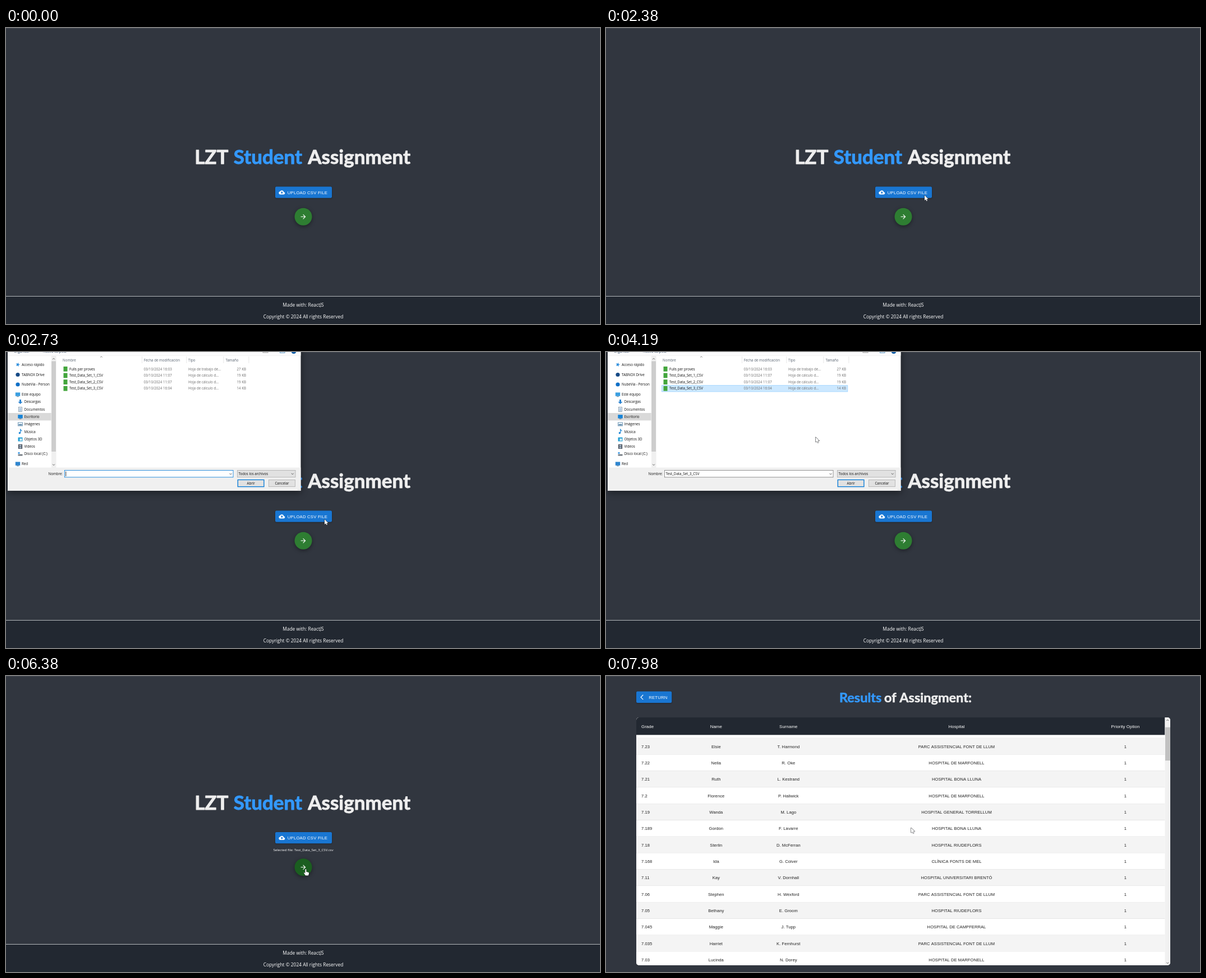
These frames come from a looping animation (1059x529 px, 8 s). An HTML page with a canvas:

```html
<!DOCTYPE html>
<html lang="en">
<head>
<meta charset="utf-8">
<title>Student Assignment</title>
<style>
html, body { margin: 0; width: 100%; height: 100%; overflow: hidden; background: #31363f; }
canvas { display: block; }
</style>
</head>
<body>
<canvas id="stage" width="1059" height="529"></canvas>
<script>
const W = 1059, H = 529, LOOP = 8000;
const stage = document.getElementById('stage').getContext('2d');
const HEAD = 'Lato, sans-serif';
const UI = '"Open Sans", "Noto Sans", sans-serif';
const ARIAL = '"Liberation Sans", Arial, sans-serif';
const BLUE = '#1976d2';

// Dialog buffer: scaled and faded as a whole
const PAD = 90;
const buffer = document.createElement('canvas');
buffer.width = 560;
buffer.height = 270 + PAD;
const dialogCtx = buffer.getContext('2d');

let g = stage;

const clamp = v => Math.max(0, Math.min(1, v));
const ramp = (t, a, b) => clamp((t - a) / (b - a));

function rect(x, y, w, h, fill) {
  g.fillStyle = fill;
  g.fillRect(x, y, w, h);
}

function round(x, y, w, h, r, fill) {
  g.beginPath();
  g.roundRect(x, y, w, h, r);
  g.fillStyle = fill;
  g.fill();
}

function disc(x, y, r, fill) {
  g.beginPath();
  g.arc(x, y, r, 0, 7);
  g.fillStyle = fill;
  g.fill();
}

function frame(x, y, w, h, fill, line, width = 0.8) {
  rect(x, y, w, h, fill);
  g.strokeStyle = line;
  g.lineWidth = width;
  g.strokeRect(x, y, w, h);
}

function poly(points, line, width) {
  g.beginPath();
  points.forEach(([x, y]) => g.lineTo(x, y));
  g.strokeStyle = line;
  g.lineWidth = width;
  g.stroke();
}

function chevron(x, y, dir, size, line) {
  poly([[x - size, y - dir * size / 2], [x, y + dir * size / 2], [x + size, y - dir * size / 2]], line, 0.9);
}

// y is the middle of the capitals
function text(str, x, y, size, fill, { font = UI, weight = 400, align = 'left', space = 0 } = {}) {
  g.font = `${weight} ${size}px ${font}`;
  g.textAlign = align;
  g.letterSpacing = space + 'px';
  g.fillStyle = fill;
  g.fillText(str, x, y + size * 0.36);
}

// Bold heading, thickened with a thin outline
function heading(str, x, y, size, fill, align = 'left') {
  text(str, x, y, size, fill, { font: HEAD, weight: 700, align });
  g.lineJoin = 'round';
  g.lineWidth = size * 0.025;
  g.strokeStyle = fill;
  g.strokeText(str, x, y + size * 0.36);
}

function icon(path, x, y, size, fill) {
  g.save();
  g.translate(x - size / 2, y - size / 2);
  g.scale(size / 24, size / 24);
  g.fillStyle = fill;
  g.fill(path);
  g.restore();
}

function shadowed(dy, blur, alpha, draw) {
  g.save();
  g.shadowColor = `rgba(0,0,0,${alpha})`;
  g.shadowOffsetY = dy;
  g.shadowBlur = blur;
  draw();
  g.restore();
}

const CLOUD = new Path2D('M19.35 10.04C18.67 6.59 15.64 4 12 4 9.11 4 6.6 5.64 5.35 8.04 2.34 8.36 0 10.91 0 14c0 3.31 2.69 6 6 6h13c2.76 0 5-2.24 5-5 0-2.64-2.05-4.78-4.65-4.96zM14 13v4h-4v-4H7l5-5 5 5h-3z');
const FORWARD = new Path2D('M12 4l-1.41 1.41L16.17 11H4v2h12.17l-5.58 5.59L12 20l8-8z');
const BACK = new Path2D('M17.77 3.77 16 2 6 12l10 10 1.77-1.77L9.54 12z');

// Pointer: [time, x, y]
const TRACK = [
  [440, 947, 521], [650, 842, 462], [860, 730, 412], [1070, 643, 374], [1210, 608, 360],
  [1420, 590, 334], [1700, 570, 302], [1840, 568, 299], [2730, 568, 299],
  [3010, 518, 246], [3280, 460, 213], [3480, 330, 120], [3700, 228, 64], [3840, 226, 63],
  [4000, 300, 108], [4130, 373, 150], [4250, 375, 154], [4600, 439, 231], [4830, 441, 233],
  [4945, 531, 238], [5015, 561, 288], [5250, 560, 318], [5560, 541, 346], [5770, 540, 347],
  [5980, 534, 345], [7240, 534, 345], [7310, 538, 315], [7400, 542, 285], [7510, 544, 271],
  [8000, 544, 271]
];

function pointerAt(t) {
  const step = 69.4;
  const q = Math.max(440, 440 + Math.floor((t - 435) / step) * step);
  const i = Math.max(1, TRACK.findIndex(k => k[0] >= q));
  const [a, b] = [TRACK[i - 1], TRACK[i]];
  const p = ramp(q, a[0], b[0]);
  return { x: a[1] + (b[1] - a[1]) * p, y: a[2] + (b[2] - a[2]) * p };
}

const ARROW = new Path2D('M0 0V9.2L2.1 7.3 3.5 10.4 5 9.8 3.6 6.7H6.5Z');
const HAND = new Path2D('M-.6 1Q.4-1 1.4 1V5L5 5.8Q6.4 6.3 6 8.5L5 11.6H0L-2.8 7.4Q-3 6-1.8 6.4L-.6 7.6Z');

function drawPointer(p, hand) {
  g.save();
  g.translate(p.x, p.y);
  g.lineJoin = 'round';
  g.lineWidth = 1;
  g.strokeStyle = '#15171b';
  g.fillStyle = '#fff';
  const shape = hand ? HAND : ARROW;
  g.stroke(shape);
  g.fill(shape);
  g.restore();
}

function backdrop() {
  rect(0, 0, W, H, '#31363f');
  rect(0, 0, W, 1, '#444951');
}

function button(x, y, w, label, textX, path, iconX) {
  shadowed(0.8, 2.5, 0.35, () => round(x, y, w, 20.3, 2.2, BLUE));
  icon(path, iconX, y + 10.3, 11, '#fff');
  text(label, textX, y + 10.3, 7.72, '#fff', { font: ARIAL, space: 0.2 });
}

function home(t, pointer) {
  backdrop();
  const chosen = t >= 5015;
  const shift = chosen ? 4.5 : 0;
  const titleY = 230.5 - shift;
  heading('LZT', 396.5, titleY, 35, '#eee', 'right');
  heading('Student', 405.8, titleY, 35, '#3399ff');
  heading('Assignment', 538.2, titleY, 35, '#eee');

  const top = 283.5 - shift;
  button(480, top, 101, 'UPLOAD CSV FILE', 501.8, CLOUD, 491.8);
  const press = ramp(t, 2110, 2380);
  if (press > 0 && press < 1) {
    g.save();
    g.beginPath();
    g.roundRect(480, top, 101, 20.3, 2.2);
    g.clip();
    disc(568, 299, 20 + 90 * press, `rgba(255,255,255,${0.2 * (1 - press)})`);
    g.restore();
  }
  const label = { align: 'center', weight: 500 };
  if (chosen) text('Selected file: Test_Data_Set_3_CSV.csv', 530, 311, 6.15, '#fff', label);

  const cy = 337.3 + shift;
  const over = chosen && Math.hypot(pointer.x - 530, pointer.y - cy) < 15.5;
  shadowed(2, 7, 0.4, () => disc(530, cy, 15.5, over ? '#1b5e20' : '#2e7d32'));
  icon(FORWARD, 530, cy, 13.2, '#fff');

  rect(0, 479, W, 50, '#222831');
  rect(0, 479, W, 1, '#b4b7bb');
  text('Made with: ReactJS', 530, 495, 8.35, '#fff', label);
  text('Copyright © 2024 All rights Reserved', 530, 515.5, 8.4, '#fff', label);
  return over;
}

const FILES = [
  ['Fulls per proves', '03/10/2024 16:03', 'Hoja de trabajo de...', '27 KB'],
  ['Test_Data_Set_1_CSV', '03/10/2024 11:07', 'Hoja de cálculo d...', '19 KB'],
  ['Test_Data_Set_2_CSV', '03/10/2024 11:07', 'Hoja de cálculo d...', '19 KB'],
  ['Test_Data_Set_3_CSV', '03/10/2024 16:04', 'Hoja de cálculo d...', '14 KB']
];

const PLACES = [
  ['Acceso rápido', 22.5, 0, 'star', '#2f8fdd'], ['TABNOX Drive', 40.5, 0, 'disc', '#164a86'],
  ['NubeVia - Person', 58, 0, 'disc', '#0f6fc6'], ['Este equipo', 76, 0, 'screen', '#3a9fe0'],
  ['Descargas', 89, 1, 'down', '#2b83d0'], ['Documentos', 102.5, 1, 'page', '#7d92a5'],
  ['Escritorio', 115.8, 1, 'screen', '#1583d8'], ['Imágenes', 129, 1, 'photo', '#5b87a8'],
  ['Música', 142.3, 1, 'note', '#1c86d6'], ['Objetos 3D', 155.6, 1, 'cube', '#26a0d4'],
  ['Vídeos', 169, 1, 'film', '#4a4f58'], ['Disco local (C:)', 182.2, 1, 'disk', '#737a82'],
  ['Red', 200, 0, 'screen', '#2f86cf']
];

function placeIcon(kind, x, y, fill) {
  if (kind === 'disc') disc(x, y, 3.6, fill);
  else if (kind === 'star' || kind === 'down') {
    g.beginPath();
    if (kind === 'star') {
      for (let i = 0; i < 10; i++) {
        const r = i % 2 ? 1.7 : 4, a = i * Math.PI / 5 - 1.3;
        g.lineTo(x + r * Math.cos(a), y + r * Math.sin(a));
      }
    } else {
      [[-1.5, -4], [1.5, -4], [1.5, 0], [4, 0], [0, 4], [-4, 0], [-1.5, 0]].forEach(p => g.lineTo(x + p[0], y + p[1]));
    }
    g.fillStyle = fill;
    g.fill();
  } else if (kind === 'note') {
    disc(x - 1.2, y + 2.5, 1.7, fill);
    poly([[x + 0.2, y + 2.5], [x + 0.2, y - 4], [x + 2.8, y - 1]], fill, 1.2);
  } else if (kind === 'page') {
    frame(x - 3, y - 4, 6, 8, '#f5f8fb', fill);
    for (let i = -2; i <= 2; i += 2) rect(x - 1.8, y + i, 3.6, 0.8, '#4d88bd');
  } else if (kind === 'photo') {
    frame(x - 4, y - 3, 8, 6, '#e8f2f9', fill);
    rect(x - 3, y, 6, 2.2, fill);
  } else if (kind === 'film') {
    rect(x - 3.6, y - 4, 7.2, 8, fill);
    rect(x - 2, y - 3, 4, 2.6, '#9fb4c7');
    rect(x - 2, y + 0.5, 4, 2.6, '#9fb4c7');
  } else if (kind === 'disk') {
    rect(x - 4, y + 0.5, 8, 2.8, fill);
    rect(x - 4, y - 3, 3, 2.6, '#2b8fe0');
  } else if (kind === 'cube') {
    rect(x - 4, y - 3, 8, 7, fill);
    rect(x - 1, y - 1, 4, 4, '#d4f0fa');
  } else {
    rect(x - 4.2, y - 3.6, 8.4, 6.4, fill);
    rect(x - 2, y + 3.3, 4, 0.9, '#5b7488');
  }
}

function dialog(t, pointer) {
  const grey = '#6d6d6d', small = 6.2;
  g.clearRect(0, 0, buffer.width, buffer.height);
  g.save();
  g.translate(0, PAD);
  shadowed(3, 12, 0.45, () => rect(3, -84, 522.5, 332, '#fff'));

  // Toolbar
  rect(3, -84, 522.5, 90, '#fbfbfc');
  text('Organizar', 14, -1.6, small, '#1e395b');
  text('Nueva carpeta', 66, -1.6, small, '#1e395b');
  chevron(55, -1, 1, 1.6, '#555');
  frame(458, -4, 9, 5, '#eee', '#8f8f8f');
  chevron(476, -1, 1, 1.6, '#555');
  frame(488.5, -4, 8.5, 5.5, '#fff', '#3d86bd');
  disc(513, -1.2, 4.4, '#1660a8');
  rect(3, 6, 522.5, 0.7, '#ececec');

  // Places
  rect(3, 109, 77.5, 13.4, '#d9d9d9');
  g.save();
  g.beginPath();
  g.rect(3, 0, 77.3, 207);
  g.clip();
  for (const [name, y, depth, kind, fill] of PLACES) {
    placeIcon(kind, 21 + depth * 4.5, y, fill);
    text(name, 28 + depth * 4.4, y, small, '#111');
  }
  g.restore();
  rect(81, 7, 8.5, 200, '#f0f0f0');
  rect(81, 16.5, 8, 161.5, '#cdcdcd');
  chevron(85, 12.3, -1, 2, '#505050');
  chevron(85, 201.5, 1, 2, '#505050');

  // File list
  [242, 321.5, 387.5, 432.5].forEach(x => rect(x, 8, 0.8, 12, '#e2e2e2'));
  chevron(170, 8.7, -1, 1.8, '#777');
  [['Nombre', 101], ['Fecha de modificación', 245.7], ['Tipo', 325], ['Tamaño', 391.5]]
    .forEach(([s, x]) => text(s, x, 14.5, small, '#55606e'));
  const picked = t >= 3770;
  FILES.forEach(([name, date, type, size], i) => {
    const y = 30.4 + i * 11.6, top = y - 5.8;
    const over = t < 4400 && pointer.x > 99 && pointer.x < 431 && pointer.y >= top && pointer.y < top + 11.6;
    if (picked && i === 3) frame(99.5, top + 0.3, 331.3, 11.2, '#cce8ff', '#99d1ff');
    else if (over) rect(99.5, top, 331.5, 11.6, '#e5f3ff');
    rect(102.5, y - 4.4, 7, 8.8, '#43a63c');
    text(name, 113, y, small, '#111');
    text(date, 245.5, y, small, grey);
    text(type, 325, y, small, grey);
    text(size, 428, y, small, grey, { align: 'right' });
  });

  // Footer
  rect(3, 206.5, 522.5, 41.5, '#f0f0f0');
  text('Nombre:', 101, 217.6, small, '#111', { align: 'right' });
  frame(104.5, 211.5, 300.5, 12.3, '#fff', picked ? '#7a7a7a' : '#0078d7');
  const marked = t >= 4760;
  if (marked) rect(106, 213.3, 61, 9, '#0078d7');
  if (picked) text(FILES[3][0], 106.5, 217.8, small, marked ? '#fff' : '#111');
  else if ((t - 2600) % 1060 < 530) rect(106.4, 213.5, 0.8, 8.5, '#000');
  chevron(400.5, 218, 1, 2, '#444');
  frame(412.5, 211.5, 103.5, 12.3, '#e1e1e1', '#adadad');
  text('Todos los archivos', 414.6, 217.6, small, '#111');
  chevron(510.8, 217.8, 1, 2, '#444');
  const overOpen = pointer.x > 413 && pointer.x < 460 && pointer.y > 228 && pointer.y < 241;
  frame(413.3, 228.4, 46.6, 12.3, overOpen ? '#e5f1fb' : '#e1e1e1', '#0078d7', 1.3);
  frame(468.5, 228.4, 47, 12.3, '#e1e1e1', '#adadad');
  text('Abrir', 436.7, 234.4, small, '#111', { align: 'center' });
  text('Cancelar', 492, 234.4, small, '#111', { align: 'center' });
  for (let i = 0; i < 3; i++) rect(523.5 - i * 1.6, 245.8, 0.8, 0.8, '#b4b4b4');
  g.restore();
}

function showDialog(t, pointer) {
  const open = ramp(t, 2480, 2680);
  const close = ramp(t, 4910, 5040);
  const alpha = open * (1 - close);
  if (alpha <= 0) return;
  g = dialogCtx;
  dialog(t, pointer);
  g = stage;
  const scale = 1 - 0.06 * (1 - open) - 0.0445 * close;
  g.save();
  g.globalAlpha = alpha;
  g.translate(264, 82);
  g.scale(scale, scale);
  g.drawImage(buffer, -264, -82 - PAD);
  g.restore();
}

const PARC = 'PARC ASSISTENCIAL FONT DE LLUM', MAR = 'HOSPITAL DE MARFONELL';
const BONA = 'HOSPITAL BONA LLUNA', RIU = 'HOSPITAL RIUDEFLORS';
const RESULTS = [
  ['7.28', 'Audrey', 'S. Pellworth', BONA], ['7.25', 'Clifton', 'O. Varden', RIU],
  ['7.23', 'Elsie', 'T. Harmond', PARC], ['7.22', 'Nella', 'R. Oke', MAR],
  ['7.21', 'Ruth', 'L. Kestrand', BONA], ['7.2', 'Florence', 'P. Hallwick', MAR],
  ['7.19', 'Wanda', 'M. Lago', 'HOSPITAL GENERAL TORRELLUM'], ['7.189', 'Gordon', 'F. Lavarre', BONA],
  ['7.18', 'Sterlin', 'D. McFerran', RIU], ['7.168', 'Ida', 'G. Colver', 'CLÍNICA FONTS DE MEL'],
  ['7.11', 'Kay', 'V. Dornhall', 'HOSPITAL UNIVERSITARI BRENTÓ'], ['7.06', 'Stephen', 'H. Wexford', PARC],
  ['7.05', 'Bethany', 'E. Groom', RIU], ['7.045', 'Maggie', 'J. Tupp', 'HOSPITAL DE CAMPFERRAL'],
  ['7.035', 'Harriet', 'K. Fernhurst', PARC], ['7.03', 'Lucinda', 'N. Dorey', MAR]
];

function tableRow(cells, y, size, fill) {
  const xs = [63, 196.3, 325.3, 625, 926];
  cells.forEach((s, i) => text(s, xs[i], y, size, fill, { font: ARIAL, align: i ? 'center' : 'left', space: 0.08 }));
}

function results(t) {
  const scroll = t < 7910 ? 0 : t < 7975 ? 24 : 52.6;
  const rowH = 29.33;
  backdrop();
  button(54, 27.6, 63.2, 'RETURN', 76.2, BACK, 64);
  heading('Results', 416, 39, 23.5, '#3399ff');
  heading('of Assingment:', 652, 39, 23.5, '#eee', 'right');

  g.save();
  g.beginPath();
  g.roundRect(54, 74, 952, 443, 5);
  g.clip();
  rect(54, 74, 952, 443, '#fff');
  RESULTS.forEach((row, i) => {
    const top = 105.2 + i * rowH - scroll;
    rect(54, top, 942.5, rowH, i % 2 ? '#fff' : '#f4f4f4');
    rect(54, top + rowH - 0.6, 942.5, 0.7, '#dcdcdc');
    tableRow([...row, '1'], top + 14.7, 7.55, '#212121');
  });
  rect(54, 74, 942.5, 31.3, '#222831');
  tableRow(['Grade', 'Name', 'Surname', 'Hospital', 'Priority Option'], 90, 7.85, '#fff');

  rect(996.5, 74, 10, 443, '#f1f1f1');
  rect(997, 84 + scroll * 0.145, 9, 59.5, '#c1c1c1');
  chevron(1001.3, 79, -1, 2, '#505050');
  chevron(1001.3, 512.8, 1, 2, '#505050');
  g.restore();
}

const start = performance.now();

function render() {
  const t = (performance.now() - start) % LOOP;
  const pointer = pointerAt(t);
  let hand = false;
  if (t < 6450) {
    hand = home(t, pointer);
    showDialog(t, pointer);
  } else {
    results(t);
  }
  if (t >= 440) drawPointer(pointer, hand);
  requestAnimationFrame(render);
}
render();
</script>
</body>
</html>
```
